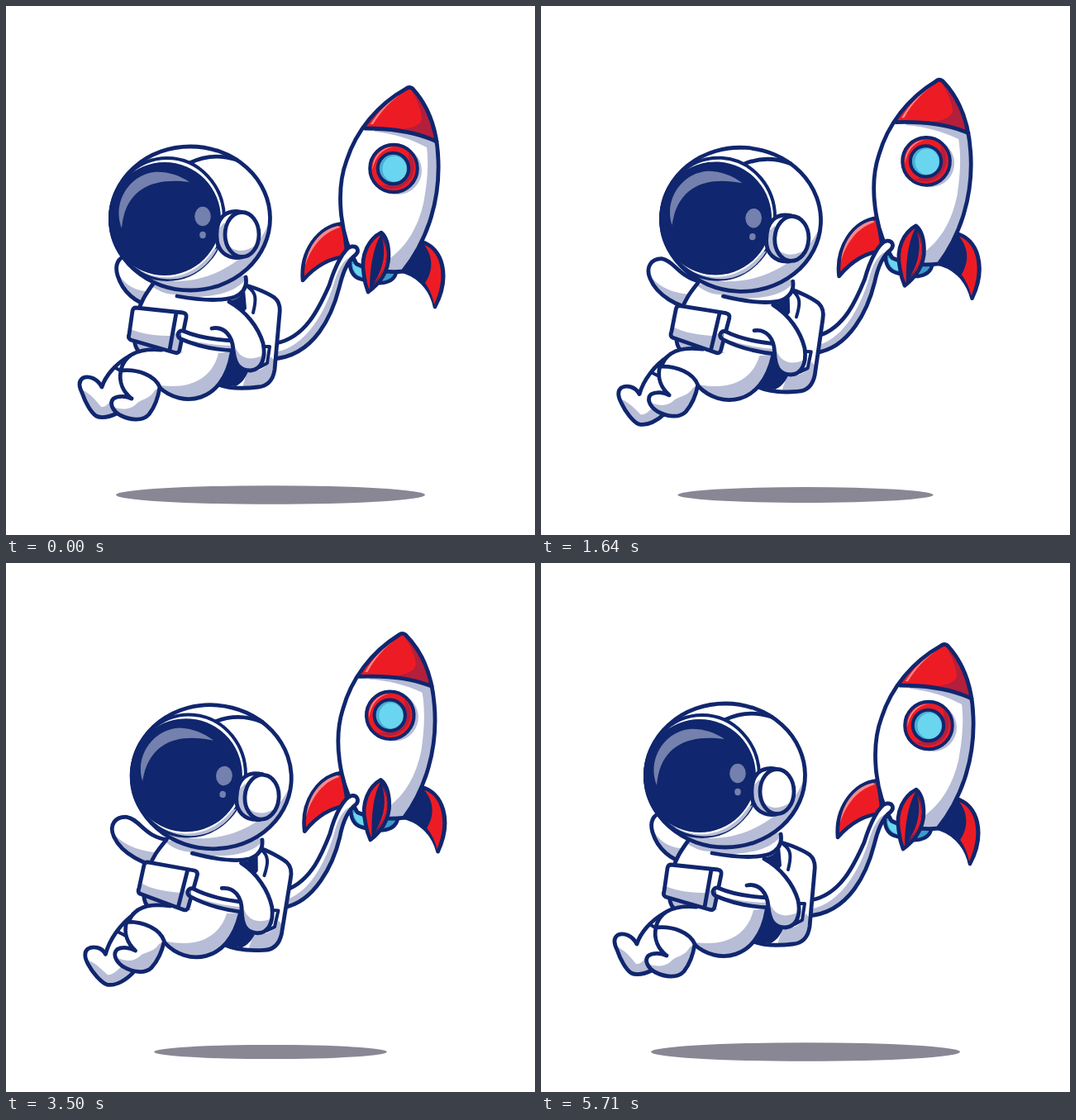
An HTML page that plays this animation: 640x640 px, repeating every 5.78 s.

```html
<!DOCTYPE html>
<html lang="en">
<head>
<meta charset="utf-8">
<title>Floating astronaut</title>
<style>
  html, body { margin: 0; width: 100%; height: 100%; overflow: hidden; background: #fff; }
  svg { display: block; width: 100%; height: 100%; }
  path, ellipse, circle { stroke-linecap: round; stroke-linejoin: round; }
  .w { fill: #fff; }
  .g { fill: #b7bdd6; }
  .n { fill: #10266e; }
  .r { fill: #ed1c24; }
  .d { fill: #b41f3b; }
  .p { fill: #f58a8d; }
  .h { fill: #7480ad; }
  .o { fill: none; stroke: #10266e; stroke-width: 4.8; }
  .ow { fill: #fff; stroke: #10266e; stroke-width: 4.8; }
  .or { fill: #ed1c24; stroke: #10266e; stroke-width: 4.6; }
  .thin { stroke-width: 4; }
</style>
</head>
<body>
<svg viewBox="0 0 640 640">
  <ellipse id="shadow" cx="320" cy="591.5" fill="#8a8795"/>

  <g id="rocket">
    <path class="or" d="M408 263 C377 266 356 298 359 332 C374 315 393 304 413 303Z"/>
    <path class="p" d="M402 266 C380 270 365 291 362 314 C368 294 382 274 404 268Z"/>
    <path class="n" stroke="#10266e" stroke-width="4.6" d="M502 285 C529 292 538 328 519 364 C514 340 497 324 476 320Z"/>
    <path class="r" d="M506 289 C527 297 533 329 518 361 C516 350 512 342 507 335 C515 323 519 306 506 289Z"/>
    <path fill="#3b9bcb" stroke="#10266e" stroke-width="4.6" d="M416 306 C415 318 419 327 428 330 C440 335 455 337 463 333 C470 330 473 323 473 317Z"/>
    <path fill="#6ad5ef" d="M419 312 C420 321 424 326 431 328 L430 314Z"/>
    <path class="w" d="M484 100 Q488 97 492 100 C512 122 522 150 523 187 C525 240 507 288 480 321 C459 323 438 319 424 312 C403 276 399 222 412 187 C424 150 450 119 484 100Z"/>
    <path class="g" d="M446 149 C475 150 500 156 521 166 L523 187 C525 240 507 288 480 321 C465 322 450 320 440 318 C475 306 496 277 505 239 C511 207 511 187 509 171 C490 161 468 154 446 152Z"/>
    <path class="r" d="M434 148 C470 148 500 154 521 164 C518 137 508 116 491 99 Q488 97 484 100 C463 112 446 128 434 148Z"/>
    <path class="d" d="M489 99 C508 116 518 137 521 164 C505 156 487 152 466 149 C485 150 502 146 503 136 C502 124 496 111 489 99Z"/>
    <path class="p" d="M481 104 C464 114 451 127 441 143 L444 143 C453 128 465 115 481 104Z"/>
    <path class="o" d="M434 148 C470 148 500 154 521 164"/>
    <path class="o" d="M484 100 Q488 97 492 100 C512 122 522 150 523 187 C525 240 507 288 480 321 C459 323 438 319 424 312 C403 276 399 222 412 187 C424 150 450 119 484 100Z"/>
    <circle class="g" cx="474" cy="199" r="29"/>
    <circle class="or thin" cx="469" cy="196.5" r="28.8"/>
    <path class="d" d="M487 177 A26.5 26.5 0 0 1 453 217 C476 218 490 202 487 177Z"/>
    <path class="p" d="M443.500 198 C443 182 455 170.500 468 170.500 C455 173 446 183 443.500 198Z"/>
    <circle cx="468.500" cy="196.500" r="18.700" fill="#4aaed4" stroke="#10266e" stroke-width="4"/>
    <ellipse cx="470" cy="197" rx="14.500" ry="15.500" fill="#6ad5ef"/>
    <path class="or" d="M454 274 C440 281 428 300 433 325 C434 335 436 341 438 346 C451 337 463 322 463 302 C463 288 460 279 454 274Z"/>
    <path class="n" d="M454 276 C445 290 440 315 440 343 C452 330 459 318 460 302 C460 290 458 282 454 276Z"/>
    <path class="r" d="M455 281 C460 297 457 318 445 335 C455 325 460 313 460 300 Q459 289 455 281Z"/>
  </g>

  <path id="hose" class="w"/>
  <path id="hoseShade" class="g"/>
  <path id="hoseLine" class="o"/>

  <path id="arm" class="w"/>
  <path id="armShade" class="g"/>
  <path id="armLine" class="o"/>

  <path id="foot" class="w"/>
  <path id="footShade" class="g"/>
  <path id="footLine" class="o"/>
  <path id="footBand" class="o thin"/>

  <g id="body">
    <!-- backpack -->
    <path class="w" d="M288 337 C300 340 318 348 325 353 C331 358 332 364 331 372 L325 440 C323 453 316 460 305 461 C290 463 270 463 257 458 L262 350Z"/>
    <path class="g" d="M292 441 C306 444 316 438 320 424 L326 430 L324 443 C322 454 316 460 305 461 L286 462Z"/>
    <path class="n" d="M264 356 C278 355 284 350 289 343 L291 366 L286 373Z"/>
    <path class="n" d="M270 418 L281 434 L293 442 C289 452 284 457 278 460 L257 458Z"/>
    <path class="o" d="M290 338 C300 340 318 348 325 353 C331 358 332 364 331 372 L325 440 C323 453 316 460 305 461 C290 463 270 463 257 458"/>
    <path class="o thin" d="M293 340 C303 347 303 355 299 371 M308 412 L319 412 L316 432 L307 437"/>
    <!-- torso -->
    <path class="w" d="M178 335 C161 362 152 395 160 418 C149 423 141 431 139 441 L186 461 C213 487 266 479 273 423 L284 368 L290 335Z"/>
    <path class="g" d="M176 339 C190 333 250 340 290 334 L288 347 C262 356 230 350 206 349 C192 349 184 344 176 339Z"/>
    <path class="g" d="M187 459 C224 464 250 450 257 420 L274 418 C269 479 214 487 187 463Z"/>
    <path class="g" d="M157 408 L206 420 L215 419 C200 413 176 415 161 418Z"/>
    <path class="n" d="M268 356 C279 357 284 350 288 346 L289 368 L285 371 C280 364 275 360 268 356Z"/>
    <path class="o" d="M178 336 C168 350 163 358 160 370 M155 402 Q156 413 160 417 M188 416 C162 414 143 421 139 441 M185 461 C213 487 263 481 273 420"/>
    <!-- tube and chest box -->
    <path class="w" d="M212 393 C230 401 250 404 278 405 L278 417 C250 416 228 411 211 403Z"/>
    <path class="g" d="M211 401 C230 407 252 411 278 411 L278 417 C250 416 228 411 211 403Z"/>
    <path class="w" d="M157 365 L214 371 Q219 372 218 377 L210 416 Q209 421 203 419 L151 404 Q147 402 149 397 L153 369 Q154 365 157 365Z"/>
    <path class="g" d="M149 390 C165 398 184 399 201 399 L206 372 L216 373 L209 416 Q208 420 203 419 L151 404Z"/>
    <path class="w" d="M208 372 L217 373 L213 397 L204 396Z"/>
    <path class="o" d="M157 365 L214 371 Q219 372 218 377 L210 416 Q209 421 203 419 L151 404 Q147 402 149 397 L153 369 Q154 365 157 365Z M206 371 L198 416"/>
    <path class="w" d="M212 393 C230 401 250 404 278 405 L278 411 L212 403Z"/>
    <path class="o" d="M278 405 C250 404 230 400 214 393 C207 392 206 401 212 403 C230 411 250 416 278 417"/>
    <!-- near arm -->
    <path class="w" d="M268 357 C290 369 305 388 311 408 C315 428 308 440 296 441 C281 441 277 432 275 416 C274 399 266 388 249 390Z"/>
    <path class="g" d="M275 407 C280 424 292 432 312 422 C310 436 305 441 296 441 C281 441 276 430 275 407Z"/>
    <path class="o" d="M270 358 C290 369 305 388 311 408 C315 428 308 440 296 441 C281 441 277 432 275 416 C274 399 264 387 249 390"/>
  </g>

  <g id="leg">
    <path class="w" d="M139 441 C160 439 180 447 186 461 C184 475 180 485 173 494 C165 503 150 501 138 495 C128 489 125 480 130 475 C136 471 146 472 152 475 C142 467 136 455 139 441Z"/>
    <path class="g" d="M128 484 C140 490 152 488 158 481 C164 475 174 476 180 465 L186 461 C184 475 180 485 173 494 C165 503 150 501 138 495 Q130 490 128 484Z"/>
    <path class="o" d="M152 475 C142 467 136 455 139 441 C160 439 180 447 186 461 C184 475 180 485 173 494 C165 503 150 501 138 495 C128 489 125 480 130 475 C136 471 146 472 152 475"/>
  </g>

  <g id="head">
    <!-- collar -->
    <path class="g" d="M190 334 L292 326 C295 341 280 356 250 356 C230 355 215 353 206 350Z"/>
    <path class="w" d="M232 352 C260 351 280 343 289 332 L291 335 C289 350 268 355 250 355Z"/>
    <path class="o" d="M207 351 C235 356 262 357 277 352 C289 346 292 338 290 328"/>
    <!-- helmet -->
    <ellipse class="w" cx="223" cy="257" rx="96.5" ry="87"/>
    <path class="g" d="M172 329 C219 340 260 327 292 298 C306 288 314 272 318 262 C316 315 272 345 223 344 C203 344 185 338 172 329Z"/>
    <ellipse class="o" cx="223" cy="257" rx="96.5" ry="87"/>
    <path class="o" d="M222 190 C240 181 260 180 279 186"/>
    <ellipse class="ow thin" cx="195" cy="257.5" rx="69" ry="73.5"/>
    <path class="g" d="M158 318 C190 338 230 328 251 295 L256 293 C236 332 194 341 158 318Z"/>
    <ellipse class="n" cx="192" cy="257.5" rx="68" ry="68.5"/>
    <path class="h" d="M140 269 C128 239 148 205 179 201 C195 200 210 205 222 213 C179 207 144 220 140 269Z"/>
    <ellipse class="h" cx="238" cy="254.5" rx="9.8" ry="11.8"/>
    <ellipse class="h" cx="238" cy="277" rx="3.8" ry="4.2"/>
    <!-- ear pad -->
    <path class="w" d="M284 249 C265 246 254 257 255 279 C255 296 267 307 285 304Z"/>
    <path class="g" d="M255 272 C254 296 267 307 285 304 L272 278 L264 262Z"/>
    <path class="o" d="M284 249 C265 246 254 257 255 279 C255 296 267 307 285 304"/>
    <ellipse class="w" cx="285.5" cy="276.5" rx="20.5" ry="27"/>
    <path class="g" d="M266 284 C272 298 288 300 304 288 C297 308 272 308 266 284Z"/>
    <ellipse class="o" cx="285.5" cy="276.5" rx="20.5" ry="27"/>
  </g>
</svg>
<script>
const LOOP = 5780, STEPS = 81;
const $ = id => document.getElementById(id);
const mix = (a, b, q) => a + (b - a) * q;

// Rigid parts: pivot x, y, then shift x, y and turn at the far pose.
const parts = {
  rocket: [465, 230, -3, -13.8, -3.05],
  body: [233, 415, 12.5, 2.7, 5],
  leg: [162, 470, 5.5, -6, 4.6],
  head: [222, 256, 31, 2, 5.5]
};

// Bending parts: the near and the far pose.
const bends = {
  hose: [
    'M326 408 C362 402 379 365 391 338 C398 315 409 293 418 291 C425 290 428 296 423 301 C412 309 407 325 403 341 C395 372 374 424 322 427',
    'M342 393 C371 381 384 347 392 326 C398 302 409 282 418 280 C425 279 428 286 423 291 C412 299 407 314 404 330 C396 364 373 408 338 415'],
  hoseShade: [
    'M326 419 C365 411 386 368 396 338 C401 321 407 308 416 304 L423 301 C412 309 407 325 403 341 C395 372 374 424 322 427',
    'M342 405 C371 394 388 356 397 326 C401 309 407 298 416 294 L423 291 C412 299 407 314 404 330 C396 364 373 408 338 415'],
  arm: [
    'M176 363 C158 360 141 346 135 326 C131 313 136 304 146 302 C158 303 165 317 182 330',
    'M196 370 C170 367 140 353 130 332 C123 317 132 307 146 308 C163 311 167 334 200 336'],
  armShade: [
    'M134 322 C148 343 162 346 180 345 L176 363 C158 360 141 346 134 322',
    'M129 328 C148 347 172 351 200 352 L196 370 C170 367 140 353 129 328'],
  foot: [
    'M150 423 C132 433 120 448 116 461 C110 450 100 447 93 450 C87 454 89 462 92 468 C96 480 103 492 109 496 C117 500 128 496 136 492 L170 470 L165 425',
    'M157 424 C140 436 126 456 121 475 C117 467 106 465 100 469 C94 474 97 482 101 489 C106 498 117 510 124 512 C136 514 150 504 158 494 L185 465 L172 425'],
  footShade: [
    'M91 464 C102 468 110 479 115 485 C122 486 125 478 131 474 L136 492 C128 496 117 500 109 496 C102 491 95 478 91 464',
    'M98 482 C108 485 117 494 124 500 C132 501 137 492 147 486 L158 494 C150 504 136 514 124 512 C115 508 104 496 98 482'],
  footBand: ['M131 437 L140 442', 'M135 447 L147 453']
};
bends.hoseLine = bends.hose;
bends.armLine = bends.arm;
bends.footLine = bends.foot.map(d => d.split(' L')[0]);

function blend([near, far], q) {
  const ends = far.match(/[\d.]+/g);
  let i = 0;
  return near.replace(/[\d.]+/g, n => mix(+n, +ends[i++], q).toFixed(2));
}

const wave = a => (1 - Math.cos(a)) / 2;

function draw(step) {
  const angle = 2 * Math.PI * step / (STEPS - 1);
  const even = wave(angle);
  // The astronaut swings back a little ahead of the rocket.
  const swing = wave(angle + 0.2 * Math.max(0, -Math.sin(angle)));

  $('shadow').setAttribute('rx', mix(187, 134.5, even));
  $('shadow').setAttribute('ry', mix(11.3, 8.2, even));
  for (const [id, [x, y, dx, dy, turn]] of Object.entries(parts)) {
    const q = id === 'head' || id === 'body' ? swing : even;
    $(id).setAttribute('transform', `translate(${dx * q} ${dy * q}) rotate(${turn * q} ${x} ${y})`);
  }
  for (const id in bends) {
    const q = id.startsWith('hose') ? (even + swing) / 2 : even;
    $(id).setAttribute('d', blend(bends[id], q));
  }
}

const start = performance.now();
let shown = -1;
function tick() {
  const time = (performance.now() - start) % LOOP;
  const step = Math.min(STEPS - 1, Math.floor((time + 5) / LOOP * STEPS));
  if (step !== shown) draw(shown = step);
  requestAnimationFrame(tick);
}
tick();
</script>
</body>
</html>
```
